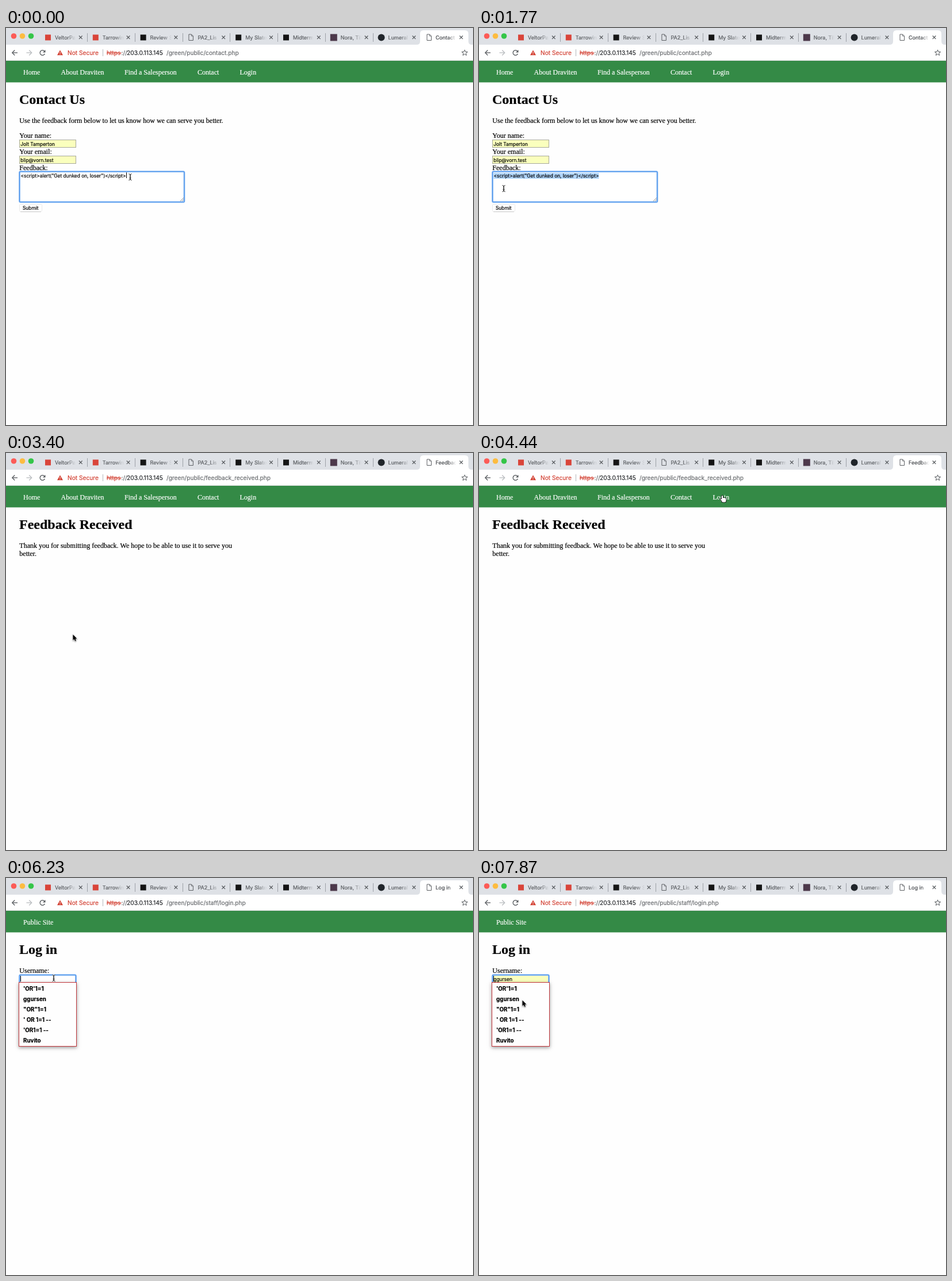
These frames come from a looping animation (812x690 px, 8 s). An HTML page with a canvas:

```html
<!DOCTYPE html>
<html lang="en">
<head>
<meta charset="utf-8">
<title>Contact form</title>
<style>
html, body { margin: 0; width: 100%; height: 100%; overflow: hidden; background: #fefefe; }
canvas { display: block; width: 812px; height: 690px; }
</style>
</head>
<body>
<canvas id="stage" width="812" height="690"></canvas>
<script>
const ctx = document.getElementById('stage').getContext('2d');
const LOOP = 8000;
const SANS = 'Inter, sans-serif';
const SERIF = '"Liberation Serif", "Times New Roman", serif';
const STRIP = '#dee1e6';
const PAGE = '#fefefe';
const HOST = '203.0.113.145';
const SCRIPT_TEXT = '<script>alert("Get dunked on, loser")<\/script>';
const SUGGESTIONS = ["'OR'1=1", 'ggursen', '"OR"1=1', "' OR 1=1 --", "'OR1=1 --", 'Ruvito'];
const TABS = [
  ['VeltorPa', 'red'], ['Tarrowin', 'red'], ['Review S', 'black'], ['PA2_Lis', 'page'],
  ['My Slate', 'black'], ['Midterm', 'black'], ['Nora, Til', 'purple'], ['Lumeral', 'disc']
];

const SCENES = {
  contact: {
    tab: 'Contact U', path: '/green/public/contact.php', heading: 'Contact Us',
    lines: ['Use the feedback form below to let us know how we can serve you better.']
  },
  received: {
    tab: 'Feedback', path: '/green/public/feedback_received.php', heading: 'Feedback Received',
    lines: ['Thank you for submitting feedback. We hope to be able to use it to serve you', 'better.']
  },
  login: { tab: 'Log in', path: '/green/public/staff/login.php', heading: 'Log in', lines: [] }
};

// Pointer moves: first step time, last step time, steps, end position.
const START = [216, 259];
const MOVES = [
  [590, 1170, 5, 5, 259],
  [1470, 1770, 3, 43, 279],
  [2370, 2810, 4, 40, 314],
  [2960, 3110, 2, 40, 321],
  [3250, 3400, 2, 116, 315],
  [3550, 4140, 5, 455, 62],
  [4290, 4440, 2, 423, 74],
  [5190, 5340, 2, 179, 161],
  [5490, 5930, 4, 83, 174],
  [7130, 7870, 6, 75, 212]
];

const smooth = p => p * p * (3 - 2 * p);
const between = (t, a, b) => t >= a && t < b;

function pointerAt(t) {
  let [x, y] = START;
  for (const [first, last, steps, toX, toY] of MOVES) {
    if (t < first) break;
    const gap = (last - first) / (steps - 1);
    const done = Math.min(steps, Math.floor((t - first + 5) / gap) + 1);
    const p = smooth(done / steps);
    x += (toX - x) * p;
    y += (toY - y) * p;
  }
  return { x, y };
}

function rect(x, y, w, h, color) {
  ctx.fillStyle = color;
  ctx.fillRect(x, y, w, h);
}

function frame(x, y, w, h, border, fill) {
  rect(x, y, w, h, border);
  rect(x + 1, y + 1, w - 2, h - 2, fill);
}

function round(x, y, w, h, r, fill, stroke, width = 1) {
  ctx.beginPath();
  ctx.roundRect(x, y, w, h, r);
  paint(fill, stroke, width);
}

function circle(x, y, r, color) {
  ctx.beginPath();
  ctx.arc(x, y, r, 0, Math.PI * 2);
  paint(color);
}

function shape(points, fill, stroke, width = 1, closed = true) {
  ctx.beginPath();
  points.forEach(([x, y], i) => i ? ctx.lineTo(x, y) : ctx.moveTo(x, y));
  if (closed) ctx.closePath();
  paint(fill, stroke, width);
}

// The fill covers the inner half of the stroke.
function paint(fill, stroke, width) {
  if (stroke) {
    ctx.strokeStyle = stroke;
    ctx.lineWidth = width;
    ctx.stroke();
  }
  if (fill) {
    ctx.fillStyle = fill;
    ctx.fill();
  }
}

const line = (x1, y1, x2, y2, color, width) =>
  shape([[x1, y1], [x2, y2]], null, color, width, false);

// A hairline stroke gives the slightly heavy desktop text smoothing.
function text(str, x, y, size, color = '#000', family = SANS, weight = 'normal') {
  ctx.font = `${weight} ${size}px ${family}`;
  ctx.fillStyle = ctx.strokeStyle = color;
  ctx.lineWidth = 0.2;
  ctx.fillText(str, x, y);
  ctx.strokeText(str, x, y);
}

const serif = (str, x, y, color) => text(str, x, y, 12, color, SERIF);

function pageIcon(x) {
  shape([[x - 3.5, 11], [x + 1, 11], [x + 4, 14], [x + 4, 21.5], [x - 3.5, 21.5]], null, '#5c5f63', 1);
  shape([[x + 1, 11], [x + 1, 14], [x + 4, 14]], null, '#5c5f63', 0.8, false);
}

function tabIcon(kind, x) {
  if (kind === 'page') pageIcon(x);
  else if (kind === 'disc') circle(x, 16.5, 6, '#20252a');
  else if (kind === 'red') rect(x - 5, 11.5, 10, 10, '#d9453a');
  else if (kind === 'black') rect(x - 5, 11.5, 10, 10, '#151515');
  else rect(x - 6, 10.5, 12, 12, '#4d394b');
}

function tabTitle(str, x, color, back) {
  ctx.save();
  ctx.beginPath();
  ctx.rect(x - 1, 6, 37, 20);
  ctx.clip();
  text(str, x, 19.5, 9, color);
  const fade = ctx.createLinearGradient(x + 22, 0, x + 36, 0);
  fade.addColorStop(0, back + '00');
  fade.addColorStop(1, back);
  rect(x + 22, 6, 15, 20, fade);
  ctx.restore();
}

function closeMark(x) {
  line(x - 2.8, 13.5, x + 2.8, 19.1, '#55585c', 1.2);
  line(x - 2.8, 19.1, x + 2.8, 13.5, '#55585c', 1.2);
}

function drawTabs(active) {
  rect(0, 0, 812, 29, STRIP);
  ['#fc5b57', '#fdbc40', '#34c648'].forEach((color, i) => circle(13.5 + i * 15, 14, 4.8, color));
  TABS.forEach(([title, icon], i) => {
    const x = i * 82.8;
    tabIcon(icon, 73 + x);
    tabTitle(title, 85 + x, '#5a5d61', STRIP);
    closeMark(129.8 + x);
    if (i < 7) rect(Math.round(141 + x), 9, 1, 15, '#9da1a7');
  });
  ctx.beginPath();
  ctx.moveTo(714, 29);
  ctx.quadraticCurveTo(720, 29, 720, 23);
  ctx.lineTo(720, 10);
  ctx.quadraticCurveTo(720, 4, 726, 4);
  ctx.lineTo(798, 4);
  ctx.quadraticCurveTo(804, 4, 804, 10);
  ctx.lineTo(804, 23);
  ctx.quadraticCurveTo(804, 29, 810, 29);
  paint('#ffffff');
  pageIcon(735.5);
  tabTitle(active, 747, '#45484c', '#ffffff');
  closeMark(791.5);
}

function arrowIcon(x, dir, color) {
  line(x - 4.5, 43, x + 4.5, 43, color, 1.3);
  shape([[x + dir * 0.3, 38.5], [x + dir * 4.7, 43], [x + dir * 0.3, 47.5]], null, color, 1.3, false);
}

function drawToolbar(path) {
  rect(0, 29, 812, 28, '#fff');
  arrowIcon(15.5, -1, '#55595d');
  arrowIcon(40, 1, '#b9bcbf');
  ctx.beginPath();
  ctx.arc(63.5, 43, 4.3, 0.45, Math.PI * 1.75);
  paint(null, '#55595d', 1.4);
  shape([[68.5, 38], [68.5, 42.4], [64, 42.4]], '#55595d');
  shape([[94, 38.5], [99, 47.3], [89, 47.3]], '#d23f31');
  rect(93.5, 41.5, 1, 3, '#fff');
  rect(93.5, 45.3, 1, 1, '#fff');
  text('Not Secure', 107, 46.7, 10.2, '#d23f31');
  rect(168, 37, 1, 12, '#b5b8bb');
  text('https', 175, 46.7, 10.2, '#d23f31');
  line(175, 43.5, 200.5, 43.5, '#d23f31', 1);
  text('://', 200.5, 46.7, 10.2, '#6a6d70');
  text(HOST, 210, 46.7, 10.2, '#25282b');
  text(path, 279, 46.7, 10.2, '#6a6d70');
  const star = Array.from({ length: 10 }, (_, i) => {
    const r = i % 2 ? 2.3 : 5.3;
    const a = i * Math.PI / 5 - Math.PI / 2;
    return [797.5 + r * Math.cos(a), 43.2 + r * Math.sin(a)];
  });
  shape(star, null, '#55595d', 1);
  rect(0, 56, 812, 1, '#d6d9d8');
}

function drawNav(isLogin) {
  rect(0, 57, 812, 37.5, '#348a46');
  const links = isLogin
    ? [['Public Site', 30]]
    : [['Home', 30], ['About Draviten', 95.5], ['Find a Salesperson', 206], ['Contact', 333], ['Login', 406.5]];
  links.forEach(([label, x]) => serif(label, x, 80.5, '#fff'));
}

function field(y, value = '', filled = false) {
  frame(23, y, 99, 14, filled ? '#a8a99a' : '#d4d4d4', filled ? '#faffbd' : '#fff');
  text(value, 25.3, y + 10.5, 8.35);
}

function button(y, pressed) {
  round(23.5, y + 0.5, 39, 12.5, 2.5, '#fff', '#d2d2d2', 1);
  line(25, y + 13.3, 61, y + 13.3, '#bcbcbc', 0.7);
  if (pressed) {
    const blue = ctx.createLinearGradient(0, y, 0, y + 13);
    blue.addColorStop(0, '#5aa5f8');
    blue.addColorStop(1, '#1768e0');
    round(23, y, 40, 13.5, 2.5, blue);
  }
  text('Submit', 29, y + 10, 8.4, pressed ? '#fff' : '#000');
}

function focusRing(x, y, w, h) {
  round(x, y, w, h, 2, null, '#a9cdf8', 3);
  round(x, y, w, h, 1.5, null, '#5a9cec', 1.7);
}

function drawContact(t, pointer) {
  serif('Your name:', 23.3, 191);
  field(194, 'Jolt Tamperton', true);
  serif('Your email:', 23.3, 219);
  field(222, 'blip@vorn.test', true);
  serif('Feedback:', 23.3, 246.5);
  rect(23, 249, 287, 53, '#fff');
  focusRing(23.5, 249.5, 286.5, 53);
  line(303, 301, 309, 295, '#777', 0.8);
  line(306, 301, 309, 298, '#777', 0.8);
  if (between(t, 590, 2070)) {
    const left = t < 1170 ? Math.max(25.5, pointer.x) : 25.5;
    rect(left, 252, Math.max(0, 208.5 - left), 10, '#b0d5fb');
  }
  text(SCRIPT_TEXT, 25.5, 260, 8.35);
  if (t < 150 || between(t, 2070, 2520)) rect(209, 251, 1, 10, '#000');
  button(306, between(t, 3110, 3250));
}

function drawSuggestions() {
  ctx.save();
  ctx.shadowColor = 'rgba(0,0,0,.4)';
  ctx.shadowBlur = 6;
  ctx.shadowOffsetY = 2;
  rect(22, 181, 101, 112, '#fff');
  ctx.restore();
  frame(22, 181, 101, 112, '#c1353a', PAGE);
  SUGGESTIONS.forEach((label, i) => text(label, 30, 196 + i * 18, 9.8, '#000', SANS, 'bold'));
}

function drawLogin(t, pointer) {
  serif('Username:', 23.3, 165);
  const open = t >= 6230;
  const row = open && pointer.y >= 183 ? Math.floor((pointer.y - 183) / 18) : -1;
  field(168, SUGGESTIONS[row], row >= 0);
  if (open) {
    focusRing(23.5, 168.5, 98, 14);
    if (!between(t, 6680, 7130)) rect(25, 170, 1, 10, '#000');
  }
  serif('Password:', 23.3, 193);
  field(196);
  button(211, false);
  if (open) drawSuggestions();
}

function drawBeam() {
  const stem = [[-2.5, -5.5], [-0.8, -5], [0, -4], [0, 4], [-0.8, 5], [-2.5, 5.5]];
  const mirror = stem.map(([x, y]) => [-x, y]);
  for (const [color, width] of [['#ffffffb0', 2.2], ['#222', 1]]) {
    shape(stem, null, color, width, false);
    shape(mirror, null, color, width, false);
    line(-1.7, 1.8, 1.7, 1.8, color, width * 0.8);
  }
}

function drawArrow() {
  ctx.shadowColor = 'rgba(0,0,0,.35)';
  ctx.shadowBlur = 2;
  ctx.shadowOffsetY = 1;
  shape([[0.5, 0.5], [0.5, 10.3], [2.7, 8.3], [4.2, 11.8], [5.9, 11], [4.4, 7.7], [7.3, 7.5]],
    '#000', '#fff', 1.4);
}

function drawHand() {
  ctx.beginPath();
  ctx.roundRect(-1, 0, 2.2, 8, 1.1);
  ctx.roundRect(-1, 4, 7.5, 7.5, 2);
  ctx.moveTo(-1, 9);
  ctx.lineTo(-4, 5.8);
  ctx.lineTo(-3, 5);
  ctx.lineTo(-1, 6.5);
  paint('#fff', '#000', 1.6);
}

function drawPointer({ x, y }, scene) {
  const overText = scene === 'contact' ? y < 304
    : scene === 'login' && x < 122 && between(y, 168, 182);
  const overLink = scene === 'received' && between(x, 404, 438) && between(y, 66, 88);
  ctx.save();
  ctx.translate(x, y);
  if (overText) drawBeam();
  else if (overLink) drawHand();
  else drawArrow();
  ctx.restore();
}

function draw(t) {
  const name = t < 3250 ? 'contact' : t < 5190 ? 'received' : 'login';
  const scene = SCENES[name];
  const pointer = pointerAt(t);
  rect(0, 0, 812, 690, PAGE);
  drawTabs(scene.tab);
  drawToolbar(scene.path);
  drawNav(name === 'login');
  text(scene.heading, 23, 132, 24, '#000', SERIF, 'bold');
  scene.lines.forEach((str, i) => serif(str, 23.3, 165 + i * 13.7));
  if (name === 'contact') drawContact(t, pointer);
  if (name === 'login') drawLogin(t, pointer);
  drawPointer(pointer, name);
}

const start = performance.now();
function tick() {
  draw((performance.now() - start) % LOOP);
  requestAnimationFrame(tick);
}
tick();
</script>
</body>
</html>
```
